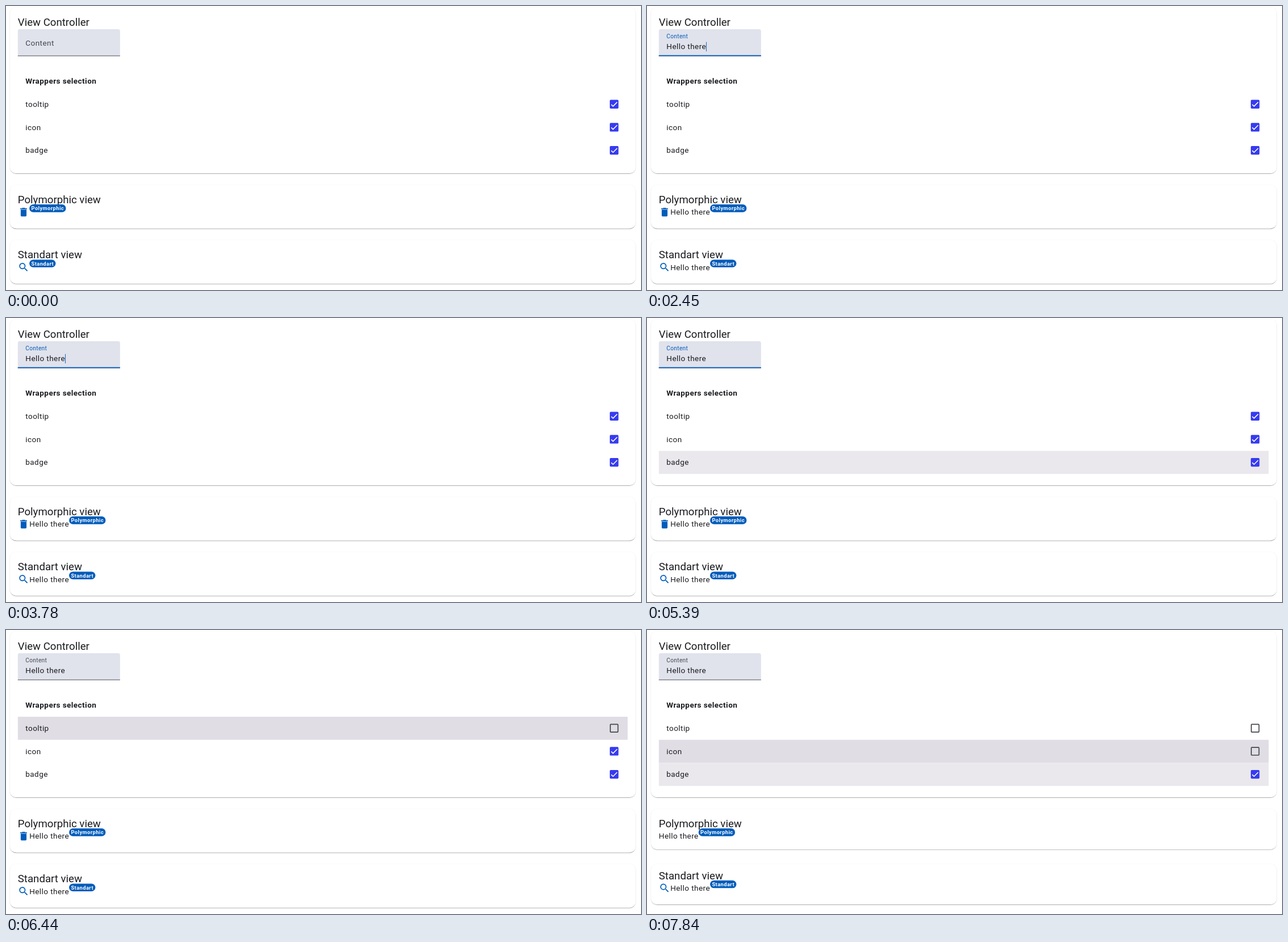
These frames come from a looping animation (1118 by 501 pixels, 8 s). An HTML page with a canvas:

```html
<!DOCTYPE html>
<html lang="en">
<head>
<meta charset="utf-8">
<title>View Controller</title>
<style>
  html, body { margin: 0; width: 100%; height: 100%; overflow: hidden; background: #fff; }
  canvas { display: block; width: 1118px; height: 501px; }
</style>
</head>
<body>
<canvas id="stage"></canvas>
<script>
const W = 1118, H = 501, LOOP = 8000, TICK = 70;
const U = 0.848;                       // one design pixel on the stage
const INK = '#1a1b1f', GREY = '#44474e', BLUE = '#005cbb', CHECK = '#363bf0';
const HOVER = '#eae8ed', FOCUS = '#e0dde4';
const LEFT = 20.8, ROW_TOP = 153, ROW_H = 40.7, ROW_W = 1073.7;
const ROWS = ['tooltip', 'icon', 'badge'];

const MESSAGE = 'Hello there';
const KEYS = [980, 1120, 1330, 1470, 1610, 1820, 1960, 2100, 2240, 2310, 2450];
// [time, hovered row], -1 for none
const HOVERS = [[0, -1], [3570, 0], [3640, 1], [3710, 2], [3780, -1], [4200, 2], [4410, -1],
  [5390, 2], [5460, 1], [5600, 0], [6720, 1], [7840, 2]];
const PRESSES = [
  { row: 0, start: 6042, x: 80, y: 185 },
  { row: 1, start: 7149, x: 80, y: 200 }
];
const UNCHECK = [6140, 7245, Infinity];
const ICON_GONE = 7280;

const TRASH = new Path2D('M6 19c0 1.1.9 2 2 2h8c1.1 0 2-.9 2-2V7H6v12zM19 4h-3.5l-1-1h-5l-1 1H5v2h14V4z');
const LENS = new Path2D('M15.5 14h-.8l-.3-.3A6.5 6.5 0 1 0 13.7 14.4l.3.3v.8l5 5 1.5-1.5-5-5z' +
  'M9.5 14a4.5 4.5 0 1 1 0-9 4.5 4.5 0 0 1 0 9z');

const canvas = document.getElementById('stage');
const ctx = canvas.getContext('2d');
const dpr = window.devicePixelRatio || 1;
canvas.width = W * dpr;
canvas.height = H * dpr;

const clamp = v => Math.max(0, Math.min(1, v));
const span = (t, start, length) => clamp((t - start) / length);
const mix = (a, b, k) => a + (b - a) * k;

// Cubic bezier timing with control points (x1, 0) and (x2, 1).
function ease(x, x1, x2) {
  let lo = 0, hi = 1;
  for (let i = 0; i < 24; i++) {
    const s = (lo + hi) / 2, r = 1 - s;
    if (3 * x1 * s * r * r + 3 * x2 * s * s * r + s * s * s < x) lo = s; else hi = s;
  }
  return lo * lo * (3 - 2 * lo);
}

function mixColor(a, b, k) {
  const part = (c, i) => parseInt(c.slice(i, i + 2), 16);
  return 'rgb(' + [1, 3, 5].map(i => Math.round(mix(part(a, i), part(b, i), k))).join(',') + ')';
}

function setFont(size, weight = 400, spacing = 0.5 * U) {
  ctx.font = `${weight} ${size}px Roboto, sans-serif`;
  ctx.letterSpacing = spacing + 'px';
}

function text(str, x, y, color = INK) {
  ctx.fillStyle = color;
  ctx.fillText(str, x, y);
}

const body = () => setFont(16 * U);

function title(str, y) {
  setFont(22 * U, 400, 0);
  text(str, LEFT, y);
}

function roundRect(x, y, w, h, r) {
  ctx.beginPath();
  ctx.roundRect(x, y, w, h, r);
}

function card(top, bottom) {
  const shadows = [[2, 1, 1, 0.2], [1, 1, 0, 0.14], [1, 3, 0, 0.12]];
  for (const [dy, blur, inset, alpha] of shadows) {
    ctx.save();
    ctx.shadowColor = `rgba(0,0,0,${alpha})`;
    ctx.shadowOffsetY = dy * U * dpr;
    ctx.shadowBlur = blur * U * dpr;
    ctx.fillStyle = '#fff';
    const d = inset * U;
    roundRect(7.3 + d, top + d, 1101 - 2 * d, bottom - top - 2 * d, 10.2 - d);
    ctx.fill();
    ctx.restore();
  }
  ctx.fillStyle = '#fff';
  roundRect(7.3, top, 1101, bottom - top, 10.2);
  ctx.fill();
}

function field(t, typed) {
  const float = ease(span(t, 120, 150), 0.4, 0.2);
  const grow = ease(span(t, 130, 200), 0.4, 0.2);
  const fade = 1 - span(t, 6045, 180);
  const tint = span(t, 120, 150) * (1 - span(t, 6090, 150));

  ctx.fillStyle = '#e0e2ec';
  roundRect(LEFT, 41, 180, 47.4, [3.4, 3.4, 0, 0]);
  ctx.fill();
  ctx.fillStyle = GREY;
  ctx.fillRect(LEFT, 87.5, 180, 0.9);
  ctx.globalAlpha = fade;
  ctx.fillStyle = BLUE;
  ctx.fillRect(LEFT + 90 * (1 - grow), 86.7, 180 * grow, 1.7);
  ctx.globalAlpha = 1;

  const scale = mix(1, 0.75, float);
  setFont(16 * U * scale, 400, 0.5 * U * scale);
  text('Content', 34.3, mix(69.6, 57.2, float), mixColor(GREY, BLUE, tint));

  body();
  text(typed, 34.3, 76);
  if (caretOn(t)) {
    ctx.fillStyle = BLUE;
    ctx.fillRect(34.2 + ctx.measureText(typed).width, 63.5, 0.9, 16.5);
  }
}

function caretOn(t) {
  if (t < 980) return t >= 210 && t < 700;
  if (t < 2450) return true;
  return t < 6090 && (t - 2450) % 1050 < 490;
}

function checkbox(cy, on) {
  const cx = 1070.7;
  ctx.strokeStyle = GREY;
  ctx.lineWidth = 2 * U;
  if (on < 1) {
    roundRect(cx - 8 * U, cy - 8 * U, 16 * U, 16 * U, 1);
    ctx.stroke();
  }
  ctx.globalAlpha = on;
  ctx.fillStyle = CHECK;
  roundRect(cx - 9 * U, cy - 9 * U, 18 * U, 18 * U, 2 * U);
  ctx.fill();
  ctx.strokeStyle = '#fff';
  ctx.lineWidth = 1.55;
  ctx.beginPath();
  ctx.moveTo(cx - 5.1, cy + 0.45);
  ctx.lineTo(cx - 1.93, cy + 3.6);
  ctx.lineTo(cx + 5.3, cy - 3.65);
  ctx.stroke();
  ctx.globalAlpha = 1;
}

function ripple(t, { row, start, x, y }) {
  const alpha = 0.1 * (1 - span(t, start + 225, 115));
  if (t < start || alpha <= 0) return;
  const top = ROW_TOP + row * ROW_H;
  const reach = Math.hypot(LEFT + ROW_W - x, Math.max(y - top, top + ROW_H - y));
  ctx.save();
  ctx.beginPath();
  ctx.rect(LEFT, top, ROW_W, ROW_H);
  ctx.clip();
  ctx.fillStyle = `rgba(0,0,0,${alpha})`;
  ctx.beginPath();
  ctx.arc(x, y, reach * ease(span(t, start, 225), 0, 0.2), 0, Math.PI * 2);
  ctx.fill();
  ctx.restore();
}

function list(t) {
  setFont(16 * U, 600);
  text('Wrappers selection', 34.3, 137.3);

  const hovered = HOVERS.filter(h => h[0] <= t).pop()[1];
  const press = PRESSES.filter(p => p.start <= t).pop();
  const focused = press ? press.row : -1;

  ROWS.forEach((name, i) => {
    const top = ROW_TOP + i * ROW_H;
    if (i === focused || i === hovered) {
      ctx.fillStyle = i === focused ? FOCUS : HOVER;
      ctx.fillRect(LEFT, top, ROW_W, ROW_H);
    }
  });
  PRESSES.forEach(p => ripple(t, p));
  ROWS.forEach((name, i) => {
    const mid = ROW_TOP + (i + 0.5) * ROW_H;
    body();
    text(name, 34.3, mid + 4.7);
    checkbox(mid - 0.1, 1 - span(t, UNCHECK[i], 110));
  });
}

function icon(path, y) {
  ctx.save();
  ctx.translate(LEFT, y);
  ctx.scale(U, U);
  ctx.fillStyle = BLUE;
  ctx.fill(path, 'evenodd');
  ctx.restore();
}

// y is the baseline of the content line.
function view(name, path, y, typed) {
  title(name + ' view', y - 20.2);
  let x = LEFT;
  if (path) {
    icon(path, y - 14.8);
    x += 24 * U;
  }
  body();
  text(typed, x, y);
  x += ctx.measureText(typed).width;

  setFont(11 * U, 600);
  const w = ctx.measureText(name).width + 8 * U;
  ctx.fillStyle = BLUE;
  roundRect(x, y - 18.1, w, 16 * U, 8 * U);
  ctx.fill();
  text(name, x + 4 * U, y - 8, '#fff');
}

function draw(t) {
  const typed = MESSAGE.slice(0, KEYS.filter(k => k <= t).length);
  const shown = typed.trimEnd();
  const hasIcon = t < ICON_GONE;
  const shift = hasIcon ? 0 : -5.6;

  ctx.setTransform(dpr, 0, 0, dpr, 0, 0);
  ctx.fillStyle = '#fff';
  ctx.fillRect(0, 0, W, H);

  card(2.5, 295);
  title('View Controller', 35);
  field(t, typed);
  list(t);

  card(316, 392.3 + shift);
  view('Polymorphic', hasIcon && TRASH, 368.2, shown);

  card(413, 489.6 + shift);
  view('Standart', LENS, 465.5 + shift, shown);
}

function frame() {
  const t = performance.now() % LOOP;
  draw(Math.floor(t / TICK) * TICK);
  requestAnimationFrame(frame);
}
frame();
</script>
</body>
</html>
```
